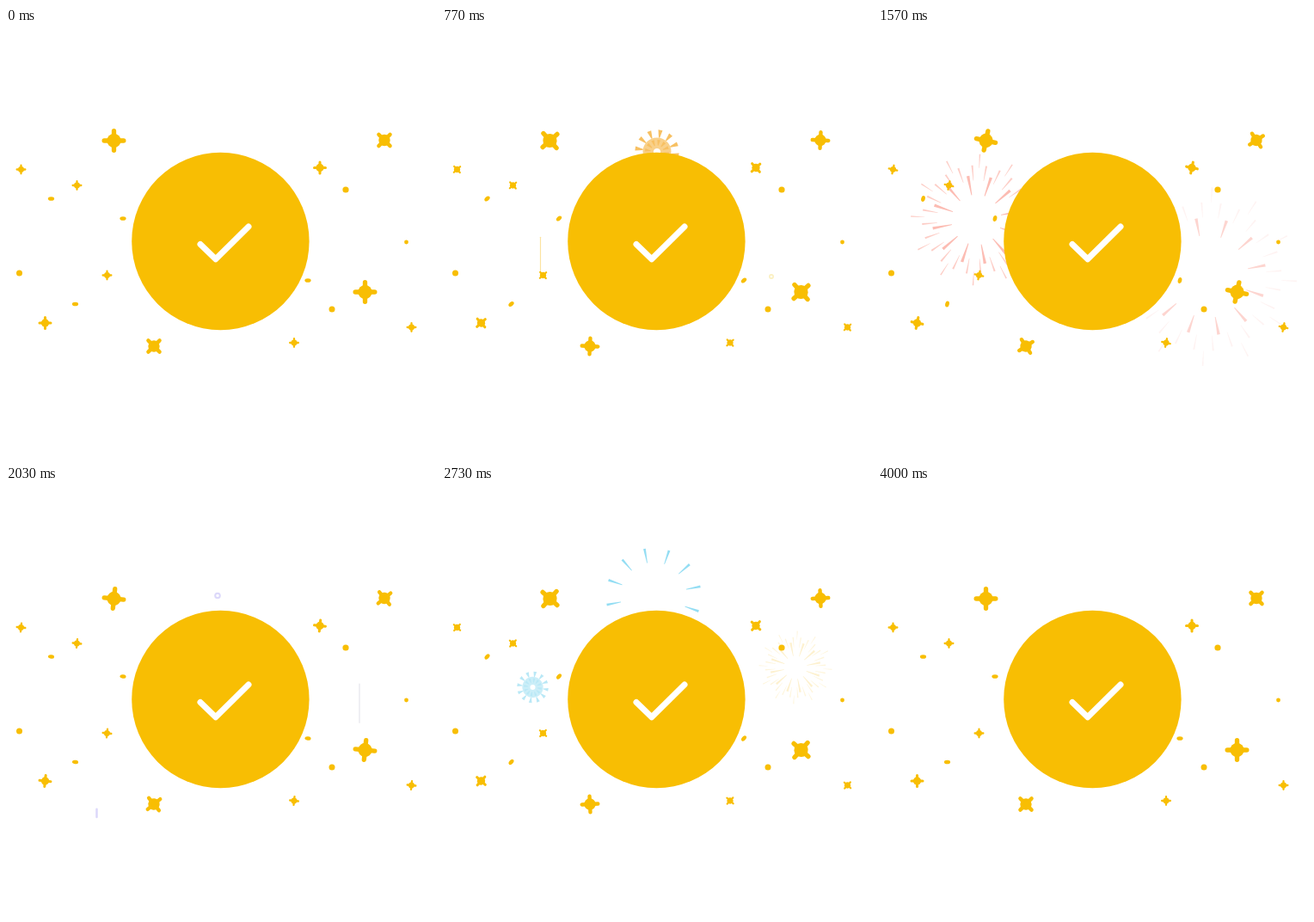
An HTML page with a canvas that plays this animation: 500x500 px, repeating every 4030 ms.

```html
<!DOCTYPE html>
<html lang="en">
<head>
<meta charset="utf-8">
<title>Success</title>
<style>
html, body { margin: 0; width: 100%; height: 100%; overflow: hidden; background: #fff; }
canvas { display: block; width: 500px; height: 500px; }
</style>
</head>
<body>
<canvas id="stage" width="500" height="500"></canvas>
<script>
const ctx = document.getElementById('stage').getContext('2d');
const GOLD = '#f8be03', LOOP = 4030, TAU = Math.PI * 2;
const rad = deg => deg * Math.PI / 180;
const clamp = v => Math.max(0, Math.min(1, v));
const ramp = (v, a, b) => clamp((v - a) / (b - a));
const mix = (a, b, k) => a + (b - a) * k;

// x, y, reach, resting angle
const stars = [
  [125.5, 131, 14, 0], [417.5, 307, 14, 0],
  [440, 130.5, 11.5, 45], [172, 370, 11.5, 45],
  [365, 162.5, 8, 0], [45.5, 343, 8, 0],
  [17.5, 164.5, 6, 0], [82.5, 183, 6, 0], [117.5, 287.5, 6, 0],
  [335, 366, 6, 0], [471.5, 348, 6, 0]
];
const ovals = [[52.5, 198.5], [136, 221.5], [80.5, 321], [351, 293.5]];
const dots = [[395, 188, 3.6], [15.5, 285, 3.5], [379, 327, 3.5], [465.5, 249, 2.4]];

// at: moment of the full sun; from: launch height; pace stretches local time
const fireworks = [
  { x: 250, y: 144, r: 119, at: 770, from: 477, pace: 1, trail: '#fbe6b4', sun: '#f7c062', burst: '#fb9f92' },
  { x: 383, y: 289, r: 104, at: 1030, from: 460, pace: 1, trail: '#fbf0c0', sun: '#fbd98a', burst: '#fdd5d0' },
  { x: 114.5, y: 223, r: 103, at: 1230, from: 405, pace: 1, trail: '#fbe3a0', sun: '#f9c838', burst: '#fcbcb3' },
  { x: 246, y: 127.5, r: 84, at: 2230, from: 392, pace: .88, trail: '#dcd8fa', sun: '#b9e8f6', burst: '#8fdcf2' },
  { x: 411, y: 211, r: 72, at: 2495, from: 392, pace: 1, trail: '#e4e4ea', sun: '#e3ecdf', burst: '#fdf1cf' },
  { x: 105.5, y: 234, r: 90, at: 2745, from: 385, pace: 1, trail: '#dcd8fa', sun: '#b9e8f6', burst: '#dfdafb' }
];

function disc(x, y, r, color) {
  ctx.fillStyle = color;
  ctx.beginPath();
  ctx.arc(x, y, r, 0, TAU);
  ctx.fill();
}

// Wedges that widen outwards, spread evenly around the origin
function rays(count, offset, inner, outer, width) {
  for (let i = 0; i < count; i++) {
    ctx.save();
    ctx.rotate(rad(offset + i * 360 / count));
    ctx.beginPath();
    ctx.moveTo(inner, -width * .12);
    ctx.lineTo(outer, -width / 2);
    ctx.lineTo(outer, width / 2);
    ctx.lineTo(inner, width * .12);
    ctx.fill();
    ctx.restore();
  }
}

function drawRocket(f, u) {
  const p = (u + 730) / 300;
  const yAt = k => mix(f.from, f.y, clamp(k));
  const head = yAt(p), tail = yAt(p - .25);
  if (p <= 0 || tail - head < .5) return;
  ctx.strokeStyle = f.trail;
  ctx.lineWidth = mix(2.6, 1, clamp(p));
  ctx.beginPath();
  ctx.moveTo(f.x, head);
  ctx.lineTo(f.x, tail);
  ctx.stroke();
}

function drawSun(f, u) {
  const r = f.r * .14 * (u + 330) / 330;
  const fade = 1 - ramp(u, 20, 90);
  if (r <= 0 || fade <= 0) return;
  const small = u < -150;
  ctx.strokeStyle = ctx.fillStyle = small ? f.trail : f.sun;
  const hole = r * (small ? .45 : .25);
  ctx.globalAlpha = fade * (small ? 1 : .75);
  ctx.lineWidth = r - hole;
  ctx.beginPath();
  ctx.arc(0, 0, (r + hole) / 2, 0, TAU);
  ctx.stroke();
  ctx.globalAlpha = fade;
  if (u > -120) {
    const tip = f.r * (.22 + .00155 * u);
    rays(12, -81, r * .45, r * .85, f.r * .03);
    rays(12, -81, r, tip, f.r * .042);
  }
  ctx.globalAlpha = 1;
}

function drawBurst(f, u) {
  if (u < 60 || u > 620) return;
  const tip = f.r * Math.min(1, .22 + .00155 * u);
  const late = ramp(u, 180, 460);
  const shown = ramp(u, 60, 120);
  const w = f.r / 119;
  ctx.fillStyle = u < 110 ? f.sun : f.burst;
  ctx.globalAlpha = shown * (1 - ramp(u, 570, 620));
  rays(12, -101, tip * mix(.28, .46, late), tip * mix(.7, .66, late), 4 * w);
  ctx.globalAlpha = shown * .75 * (1 - ramp(u, 515, 550));
  rays(24, -94.5, tip * mix(.52, .66, late), tip * .83, 2.4 * w);
  rays(12, -87, tip * mix(.74, .83, late), tip, 1.9 * w);
  ctx.globalAlpha = 1;
}

function drawFirework(f, t) {
  const u = (t - f.at) / f.pace;
  if (u < -730 || u > 620) return;
  drawRocket(f, u);
  ctx.save();
  ctx.translate(f.x, f.y);
  drawSun(f, u);
  drawBurst(f, u);
  ctx.restore();
}

function drawStar([x, y, size, rest], angle) {
  const cap = size * .19, end = size - cap;
  ctx.save();
  ctx.translate(x, y);
  ctx.rotate(rad(rest + angle));
  disc(0, 0, size * .58, GOLD);
  ctx.strokeStyle = GOLD;
  ctx.lineWidth = cap * 2;
  ctx.beginPath();
  ctx.moveTo(-end, 0);
  ctx.lineTo(end, 0);
  ctx.moveTo(0, -end);
  ctx.lineTo(0, end);
  ctx.stroke();
  ctx.restore();
}

function drawBadge() {
  disc(249.4, 248, 103.2, GOLD);
  ctx.strokeStyle = '#fff';
  ctx.lineWidth = 7;
  ctx.beginPath();
  ctx.moveTo(226, 251.5);
  ctx.lineTo(243.8, 268.8);
  ctx.lineTo(282, 231);
  ctx.stroke();
}

function draw(t) {
  const angle = t * .18;
  ctx.fillStyle = '#fff';
  ctx.fillRect(0, 0, 500, 500);
  ctx.lineCap = ctx.lineJoin = 'round';
  fireworks.forEach(f => drawFirework(f, t));
  stars.forEach(s => drawStar(s, angle));
  ctx.fillStyle = GOLD;
  for (const [x, y] of ovals) {
    ctx.beginPath();
    ctx.ellipse(x, y, 3.6, 2.3, rad(angle), 0, TAU);
    ctx.fill();
  }
  dots.forEach(([x, y, r]) => disc(x, y, r, GOLD));
  drawBadge();
}

const start = performance.now();
function tick() {
  const t = (performance.now() - start) % LOOP;
  // the picture advances 30 times a second
  draw(Math.floor((t + 3.4) * .03) / .03);
  requestAnimationFrame(tick);
}
tick();
</script>
</body>
</html>
```
